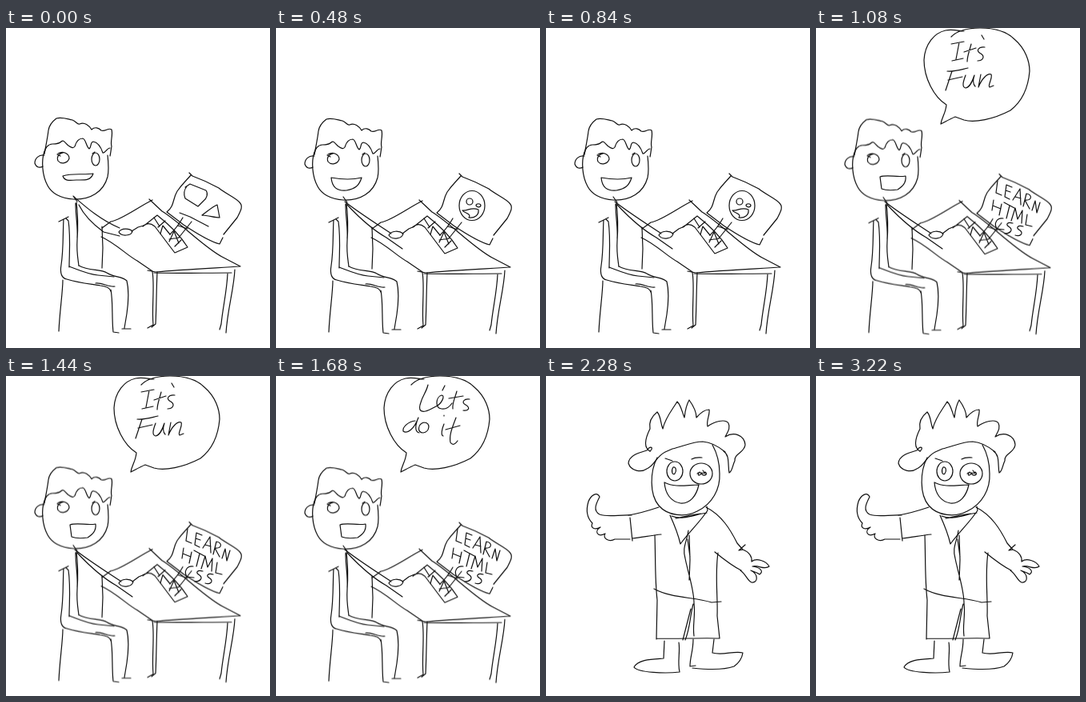
Animation, 330 px wide and 400 px high, one loop 3840 ms. Source, as an HTML page:

```html
<!DOCTYPE html>
<html lang="en">
<head>
<meta charset="utf-8">
<title>Learning is fun</title>
<style>
  html, body { margin: 0; width: 100%; height: 100%; overflow: hidden; background: #fff; }
  svg { display: block; width: 100%; height: 100%; }
  path, ellipse { fill: none; stroke: #111; stroke-width: 1.2; stroke-linecap: round; stroke-linejoin: round; }
  .cut { visibility: hidden; animation: 3840ms step-end infinite; }
  .idle { animation-name: idle; }
  .smile { animation-name: smile; }
  .happy { animation-name: happy; }
  .lively { animation-name: lively; }
  .fun { animation-name: fun; }
  .go { animation-name: go; }
  .hero { animation-name: hero; }
  .desk { animation-name: desk; }
  @keyframes idle { 0% { visibility: visible; } 12.5%, 100% { visibility: hidden; } }
  @keyframes smile { 0%, 28.125%, 100% { visibility: hidden; } 12.5% { visibility: visible; } }
  @keyframes lively { 0%, 59.375%, 100% { visibility: hidden; } 12.5% { visibility: visible; } }
  @keyframes happy { 0%, 59.375%, 100% { visibility: hidden; } 28.125% { visibility: visible; } }
  @keyframes fun { 0%, 43.75%, 100% { visibility: hidden; } 28.125% { visibility: visible; } }
  @keyframes go { 0%, 59.375%, 100% { visibility: hidden; } 43.75% { visibility: visible; } }
  @keyframes hero { 0% { visibility: hidden; } 59.375%, 100% { visibility: visible; } }
  /* the drawing settles a little lower with every cut */
  @keyframes desk {
    0% { visibility: visible; transform: none; }
    12.5% { visibility: visible; transform: translateY(1px); }
    28.125% { visibility: visible; transform: translateY(1.6px); }
    43.75% { visibility: visible; transform: translateY(2.2px); }
    59.375%, 100% { visibility: hidden; transform: none; }
  }
</style>
</head>
<body>
<svg viewBox="0 0 330 400" role="img" aria-label="A student at a desk learns HTML and CSS: It's fun, let's do it">
  <g class="cut desk">
    <!-- head -->
    <path d="M48 157C50 146 52 137 53 128C54 121 59 116 63 113C70 111 77 114 83 115C88 117 89 121 92 120C98 117 104 122 107 127C111 123 116 125 119 128C124 130 128 124 132 127C134 134 130 142 132 148C131 153 131 156 130 160"/>
    <path d="M48 157C48 150 53 145 58 145C62 145 66 145 69 142C72 139 74 144 78 147C81 149 84 151 86 148C88 141 92 138 96 138C100 139 100 148 104 151C107 149 105 143 109 142C116 143 119 150 121 156C124 157 126 150 130 150"/>
    <path d="M48 154C44 166 45 184 52 197C58 208 70 213 84 214C105 215 122 205 127 186C129 177 128 168 127 159"/>
    <path d="M48 159C41 158 36 163 36 169C38 175 43 175 46 173"/>
    <path d="M65 157C71 153 79 157 79 163C77 169 69 171 65 166C63 161 66 157 71 156M64 158L68 160"/>
    <ellipse cx="112" cy="164" rx="5" ry="8"/>
    <path d="M108 157L111 155"/>
    <!-- torso and legs -->
    <path d="M84 210L89 217M88 218C90 234 90 250 89 265C88 280 90 289 91 297M87 219C87 235 90 249 89 262M120 248L121 275L120 300"/>
    <path d="M91 297C104 304 118 301 126 306C135 312 145 310 151 316C154 328 153 343 151 357L148 375M145 376L156 376"/>
    <path d="M79 298C92 303 103 308 115 309L135 311M112 319C120 318 128 324 136 323M131 327C134 343 132 362 134 380L141 381"/>
    <!-- chair -->
    <path d="M66 242L78 236L72 239C71 255 72 276 69 296C67 308 71 313 76 314C92 319 107 320 118 322C126 323 130 325 131 329M75 238L78 241C81 262 79 282 79 299M71 315C71 330 67 355 66 379"/>
    <!-- table -->
    <path d="M120 250L131 242C144 240 165 224 183 215M179 214L195 229C218 243 246 273 270 286L293 298C262 300 218 302 187 305L177 303"/>
    <path d="M119 261C137 269 151 284 164 291L183 304M185 306C211 307 248 306 282 306"/>
    <path d="M183 305C186 322 182 350 184 371L177 375M189 305C188 326 188 350 187 370L182 374"/>
    <path d="M277 307C276 330 271 349 269 370L267 377M286 302C285 326 277 351 275 381"/>
    <!-- keyboard and stand -->
    <path d="M171 248C176 243 181 244 186 248C196 261 204 272 211 281L227 274C217 258 203 245 189 234L174 246"/>
    <path d="M185 237L192 248M193 257L196 247L205 258M190 249L199 241M204 267L210 254L216 269M204 264L216 262M211 273L219 265"/>
    <path d="M221 237C216 246 210 253 205 258M232 242L216 262M215 247L227 251"/>
    <!-- screen -->
    <path d="M229 181L233 185C244 189 257 195 266 200C276 208 287 212 292 218C297 223 293 229 289 237L272 258M271 262L267 270C255 267 237 256 222 246L201 230C211 222 208 214 214 204C221 194 226 190 231 184"/>
  </g>

  <g class="cut idle">
    <path d="M71 185C83 181 97 184 109 182C106 191 98 190 88 190C78 191 73 191 71 185"/>
    <path d="M85 211C100 224 118 240 142 250M91 221C98 235 111 247 122 255L142 260M141 255C144 250 154 250 158 254C157 260 144 261 141 255M157 254L165 249L172 247"/>
    <path d="M224 199L230 195L250 203C253 207 251 213 247 216L240 223L224 213C222 208 222 203 226 198M245 234C251 230 257 224 264 221L267 237C260 237 253 234 245 234M217 231L230 236L253 248"/>
  </g>

  <g class="cut lively">
    <path d="M86 217C101 229 123 243 144 257M89 221C104 237 122 253 138 262L158 276M141 259C144 253 154 253 159 257C158 263 146 266 141 259M158 257L166 251L173 248"/>
  </g>

  <g class="cut smile">
    <path d="M69 187C80 189 95 190 107 187C104 197 99 201 88 203C76 204 70 199 69 187"/>
    <ellipse cx="245" cy="222" rx="16" ry="18.5"/>
    <ellipse cx="242" cy="217" rx="4" ry="4"/>
    <path d="M250 222C250 219 256 219 256 222C255 225 251 224 250 222M233 228C240 229 244 223 253 227C254 234 248 238 241 237C245 232 236 232 233 228"/>
  </g>

  <g class="cut happy">
    <path d="M80 186C89 183 102 187 112 185C113 194 108 198 102 202C95 203 87 203 82 201L80 186"/>
    <!-- LEARN / HTML / CSS -->
    <path d="M227 191L225 206L232 209M238 196L236 211L242 214M238 196L245 199M237 203L243 205M246 215L255 201L256 221M249 211L256 213M259 223L263 207C271 208 270 216 261 215L267 226M270 228L274 216L276 231L280 218"/>
    <path d="M222 215L220 228M232 220L229 234M221 222L231 226M235 218L248 225M242 222L238 238M244 241L249 225L252 239L258 228L257 244M264 233L262 246L270 248"/>
    <path d="M234 238C226 237 222 244 226 251L235 252M246 244C239 242 236 246 242 249C247 253 242 257 236 257M259 248C252 246 249 250 255 253C260 257 255 261 249 259"/>
    <!-- bubble -->
    <path d="M163 96C147 86 135 62 135 40C136 20 148 6 162 3C171 1 180 4 185 4M169 11C177 3 190 0 205 0C222 0 238 4 248 14C262 26 267 42 267 54C265 78 256 93 243 103C222 114 198 119 185 115L174 111C167 114 162 117 156 120C157 112 162 107 163 96"/>
  </g>

  <g class="cut fun">
    <path d="M169 20L185 17M179 18L175 39M170 41L184 38M194 20C192 28 189 35 189 42M185 30L200 25M207 9L210 14M211 24C203 23 199 29 206 32C212 36 208 41 202 41"/>
    <path d="M164 54C172 55 181 52 190 50M170 54L162 78M165 65L183 61M187 59C184 67 182 74 187 75C193 74 196 65 198 59C196 65 196 70 199 73M206 58L203 74C207 64 214 56 219 58C221 63 214 72 217 74L222 72"/>
  </g>

  <g class="cut go">
    <path d="M190 11C188 20 183 25 181 33C177 44 182 45 187 44C192 43 196 40 200 38C207 35 212 24 207 24C200 26 198 40 207 41C214 42 218 37 220 34M211 12L208 18M226 19C224 27 220 34 221 41M216 28L234 25M242 29C235 28 231 33 237 36C244 40 240 44 234 43"/>
    <path d="M174 56C166 57 158 63 159 69C164 73 173 66 178 52C174 61 173 70 179 71M185 58C177 60 176 71 184 71C192 70 194 58 185 58M210 60C207 67 206 74 209 75M210 49L210 50M225 52C221 63 216 74 218 83C221 88 225 84 227 81M212 67L230 62"/>
  </g>

  <g class="cut hero">
    <!-- hair -->
    <path d="M130 94C121 89 125 76 130 66C128 56 134 49 139 45C144 51 143 59 146 66C149 52 158 42 164 32C169 37 170 45 173 52C174 43 176 35 179 30C184 37 188 45 188 52C193 46 199 42 204 42C205 49 200 56 202 63C210 57 224 53 228 59C231 65 227 70 224 76C235 69 248 74 249 86C248 96 235 97 236 106C233 112 233 119 229 121C227 111 230 99 222 94"/>
    <path d="M130 94C135 90 131 86 126 93C116 96 104 99 103 109C106 119 119 121 126 116C135 113 137 101 149 95L158 91C171 88 183 82 196 82C209 83 218 90 224 95"/>
    <!-- face -->
    <path d="M139 102C130 119 129 148 141 162C152 175 174 177 189 169C208 160 218 141 217 122C217 107 213 95 208 86M149 103L158 106M182 104C187 101 191 102 195 102"/>
    <ellipse cx="161" cy="119" rx="10" ry="12"/>
    <ellipse cx="194" cy="122" rx="14" ry="13"/>
    <path d="M159 114C156 118 158 125 161 122C164 118 162 113 159 114M189 122C192 118 196 124 199 120C203 123 198 126 194 122C192 125 188 125 192 120M196 118L199 122"/>
    <path d="M148 133C161 140 177 136 191 136C188 150 180 160 168 159C156 157 149 147 148 133"/>
    <!-- arms -->
    <path d="M141 164C126 169 116 172 103 174M105 177L108 206M108 203C119 202 132 199 144 198"/>
    <path d="M107 174C92 173 78 177 67 173C58 168 63 159 67 151C64 144 56 149 53 157C50 167 51 177 58 184C55 190 61 193 68 189C60 194 64 202 74 197C70 203 79 208 86 204L105 204"/>
    <path d="M200 164C220 174 231 193 239 209L246 217M211 220C222 229 232 237 244 243M249 211L241 218L246 217C254 220 258 226 257 232C263 227 275 231 279 238C273 243 266 236 258 238C267 239 273 244 267 248C263 245 258 244 256 243C266 248 265 259 257 258C252 256 250 248 243 243"/>
    <!-- coat -->
    <path d="M155 174C160 185 165 197 168 210C179 195 192 183 202 168L201 163M157 175C171 181 186 173 201 171M162 178C173 176 183 173 194 172"/>
    <path d="M136 199C137 226 136 254 139 280L138 329M215 221C211 248 215 278 214 300L217 328M138 328C164 329 193 327 217 328M135 266C157 278 184 276 207 283L219 282"/>
    <path d="M178 193C176 208 170 214 174 228C178 248 185 267 185 284C187 299 183 312 185 325M179 199L180 230L179 255M177 204L180 226M184 285C180 300 180 316 174 330M181 291L171 330"/>
    <!-- legs -->
    <path d="M148 331L147 353C133 354 115 354 110 364C115 371 150 372 167 370C164 357 168 345 166 333M184 329C184 344 180 351 180 363L187 362M183 365C202 367 224 367 235 363C242 358 245 353 246 346C235 343 221 350 208 346L210 329"/>
  </g>
</svg>
</body>
</html>
```
